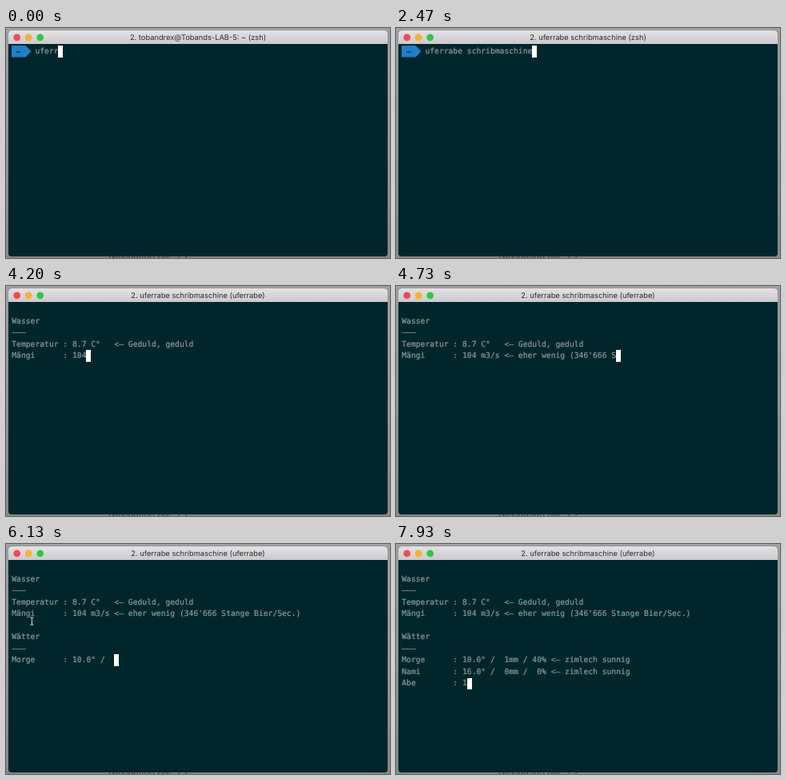
These frames come from a looping animation (480 by 288 pixels, 8 s). An HTML page:

```html
<!DOCTYPE html>
<html lang="gsw">
<head>
<meta charset="utf-8">
<title>Terminal</title>
<style>
  html, body { margin: 0; width: 100%; height: 100%; overflow: hidden; }
  body { position: relative; background: linear-gradient(#a4a4a4, #8b8b8b); text-rendering: geometricPrecision; }
  body *, #window * { position: absolute; }
  #behind { left: 128px; top: 279px; font: 11.5px/12px Inter, sans-serif; color: #3c3c3c; white-space: pre; }
  #window { left: 3px; top: 3px; width: 474px; height: 283px; border-radius: 4px; overflow: hidden;
            background: #00262c; box-shadow: 0 0 2px #6a6a6a; }
  #bar { left: 0; top: 0; width: 100%; height: 17px; background: linear-gradient(#e4e2e5, #cbc9cd); }
  #title { left: 0; top: 3.5px; width: 480px; text-align: center; white-space: pre;
           font: 9.3px/17px Inter, sans-serif; color: #2b2b2b; }
  #screen { left: 7.3px; top: 23px; margin: 0; font: 9.68px/14.55px "DejaVu Sans Mono", monospace;
            color: #8a9a9c; -webkit-text-stroke: 0.2px #8a9a9c; }
  #cursor { width: 6px; height: 14.7px; background: #fff; }
  svg { left: 0; top: 0; width: 480px; height: 288px; }
</style>
</head>
<body>
<div id="behind">Navigation bar, 1-2</div>
<div id="window"><div id="bar"></div></div>
<div id="title"></div>
<svg viewBox="0 0 480 288">
  <circle cx="13.7" cy="11.8" r="4.4" fill="#f04b53"/>
  <circle cx="28.2" cy="11.8" r="4.4" fill="#f6b12f"/>
  <circle cx="42.7" cy="11.8" r="4.4" fill="#2fc840"/>
  <g id="prompt">
    <path d="M7 22H24.5L31.5 29.3L24.5 36.6H7Z" fill="#217fc9"/>
    <text x="12.8" y="33.2" font-family="DejaVu Sans Mono, monospace" font-size="9.68"
          fill="#06222b" stroke="#06222b" stroke-width="0.3">~</text>
  </g>
</svg>
<pre id="screen"></pre>
<div id="cursor"></div>
<svg viewBox="0 0 480 288">
  <path id="pointer" d="M-2 -5Q0 -5 0 -3.5Q0 -5 2 -5M0 -3.5V3.5M-2 5Q0 5 0 3.5Q0 5 2 5"
        fill="none" stroke="#e4e8e8" stroke-width="1"/>
</svg>
<script>
// Times are in ticks of 1/15 s
const LOOP = 8000, FPS = 15, CELL = 5.828, LINE = 14.55;
const ENTER = 37, CLEAR = 38, JOB_TITLE = 49;
const FIRST_KEY = 1.3, KEY_GAP = 1.8, TYPED_BEFORE = 5;
const PRINT_START = 37.6, CHAR_TIME = 1 / 3.75, RULE_TIME = 2.67;
const POINTER_IN = 86, POINTER_OUT = 107;

const COMMAND = 'uferrabe schribmaschine';
const SHELL_TITLE = '2. tobandrex@Tobands-LAB-5: ~ (zsh)';
const OUTPUT = `
Wasser
———
Temperatur : 8.7 C°   <– Geduld, geduld
Mängi      : 104 m3/s <– eher wenig (346'666 Stange Bier/Sec.)

Wätter
———
Morge      : 10.0° /  1mm / 40% <– zimlech sunnig
Nami       : 16.0° /  0mm /  0% <– zimlech sunnig
Abe        : 1`;

const $ = id => document.getElementById(id);
const show = (id, visible) => { $(id).style.display = visible ? '' : 'none'; };

function titleAt(tick) {
  if (tick < ENTER) return SHELL_TITLE;
  return `2. ${COMMAND} (${tick < JOB_TITLE ? 'zsh' : 'uferrabe'})`;
}

function commandAt(tick) {
  const keys = Math.floor((tick - FIRST_KEY) / KEY_GAP) + 1;
  return ' '.repeat(5) + COMMAND.slice(0, TYPED_BEFORE + keys);
}

// Prints at an even pace, but lingers on the underlines
function outputAt(tick) {
  let time = PRINT_START, count = 0;
  for (const char of OUTPUT) {
    time += char === '—' ? RULE_TIME : CHAR_TIME;
    if (time > tick) break;
    count++;
  }
  return OUTPUT.slice(0, count);
}

function drawPointer(tick) {
  const part = Math.min(1, Math.max(0, (tick - POINTER_IN) / 10));
  const ease = part * part * (3 - 2 * part);
  show('pointer', tick >= POINTER_IN && tick < POINTER_OUT);
  $('pointer').setAttribute('transform', `translate(${50 * ease} ${92 + 7 * ease})`);
}

function draw() {
  const tick = Math.floor((performance.now() % LOOP + 4) * FPS / 1000) % (LOOP * FPS / 1000);
  const text = tick < CLEAR ? commandAt(tick) : outputAt(tick);
  const rows = text.split('\n');
  $('title').textContent = titleAt(tick);
  $('screen').textContent = text;
  $('cursor').style.left = 7 + rows[rows.length - 1].length * CELL + 'px';
  $('cursor').style.top = 22 + (rows.length - 1) * LINE + 'px';
  show('prompt', tick < CLEAR);
  drawPointer(tick);
  requestAnimationFrame(draw);
}
draw();
</script>
</body>
</html>
```
